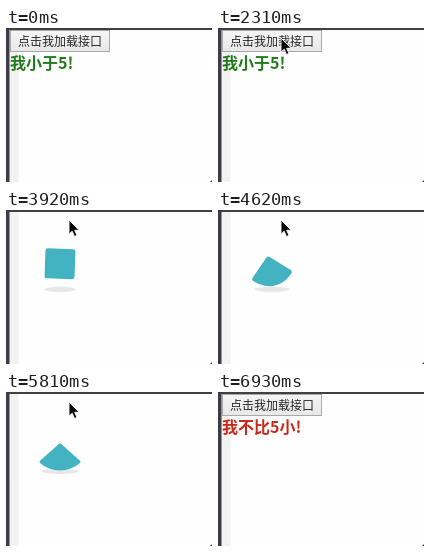
An HTML page that plays this animation: 206x154 px, repeating every 7 s.

```html
<!DOCTYPE html>
<html lang="zh">
<head>
<meta charset="utf-8">
<style>
html, body { margin: 0; width: 100%; height: 100%; overflow: hidden; background: #fefefe; }
svg { position: absolute; left: 0; top: 0; }
text { font-family: "Noto Sans CJK SC", "Noto Sans CJK", sans-serif; }
#box { position: absolute; left: 39px; top: 37.7px; width: 30px; height: 30px; background: #44b3c1; }
</style>
</head>
<body>
<svg width="206" height="154">
  <defs>
    <linearGradient id="face" x2="0" y2="1">
      <stop stop-color="#f6f5f6"/><stop offset="1" stop-color="#e9e8e9"/>
    </linearGradient>
  </defs>
  <rect x="3" y="2" width="9.5" height="152" fill="#f4f1f1"/>
  <rect width="206" height="2" fill="#403f42"/>
  <rect width="3.5" height="154" fill="#3b3c47"/>
  <path d="M206 152v2h-2z" fill="#444"/>
  <g id="page">
    <rect x="4.5" y="2.5" width="99" height="21" fill="url(#face)" stroke="#a9a8aa"/>
    <text x="12" y="17.5" font-size="12" fill="#262626">点击我加载接口</text>
    <text id="msg" x="4" y="41.4" font-size="16" font-weight="700"></text>
  </g>
  <ellipse id="shadow" cx="54" cy="79.3" ry="2.6" fill="#e7e7e7"/>
</svg>
<div id="box"></div>
<svg width="206" height="154">
  <path id="cursor" d="M0 0V14.2L3.2 11.2 5.5 16.5 8 15.4 5.7 10.3H10.2Z" fill="#080808" stroke="#fff" stroke-width=".9"/>
</svg>
<script>
const LOOP = 7000, SPIN = 520;
const loads = [[2337, 3500], [3910, 5040], [5550, 6650]];
// time, x, y of the pointer tip
const path = [
  [350, 84, 152], [560, 79, 127], [840, 79, 127], [1260, 71, 15],
  [1330, 71, 15], [1470, 63, 10], [6600, 63, 10], [6920, 112, 158]
];
const [page, msg, shadow, box, cursor] =
  ["page", "msg", "shadow", "box", "cursor"].map(id => document.getElementById(id));
const show = (el, on) => el.style.display = on ? "" : "none";
const clamp = v => Math.max(0, Math.min(1, v));

function drawLoader(p) {
  const down = 1 - Math.abs(2 * p - 1);
  const squash = 1 - 0.1 * clamp(2 * down - 1);
  const round = p < 0.5 ? clamp((p - 0.17) / 0.33) : 2 - 2 * p;
  box.style.transform = `translateY(${17 * down}px) scale(1, ${squash}) rotate(${90 * p}deg)`;
  box.style.borderRadius = `2.5px 2.5px ${2.5 + 37.5 * round}px 2.5px`;
  shadow.setAttribute("rx", 15.3 * (1 + 0.2 * down));
}

function drawCursor(t) {
  const i = path.findIndex(k => k[0] > t);
  show(cursor, i > 0);
  if (i < 1) return;
  const [t0, x0, y0] = path[i - 1], [t1, x1, y1] = path[i];
  const u = (t - t0) / (t1 - t0);
  cursor.setAttribute("transform", `translate(${x0 + (x1 - x0) * u} ${y0 + (y1 - y0) * u})`);
}

function draw(t) {
  const load = loads.find(([a, b]) => t >= a && t < b);
  show(page, !load);
  show(box, load);
  show(shadow, load);
  if (load) drawLoader((t - load[0]) / SPIN % 1);
  const small = t < loads[0][1];
  msg.textContent = small ? "我小于5!" : "我不比5小!";
  msg.setAttribute("fill", small ? "#217b1b" : "#c92a1e");
  drawCursor(t);
}

const start = performance.now();
function tick() {
  draw((performance.now() - start) % LOOP);
  requestAnimationFrame(tick);
}
tick();
</script>
</body>
</html>
```
